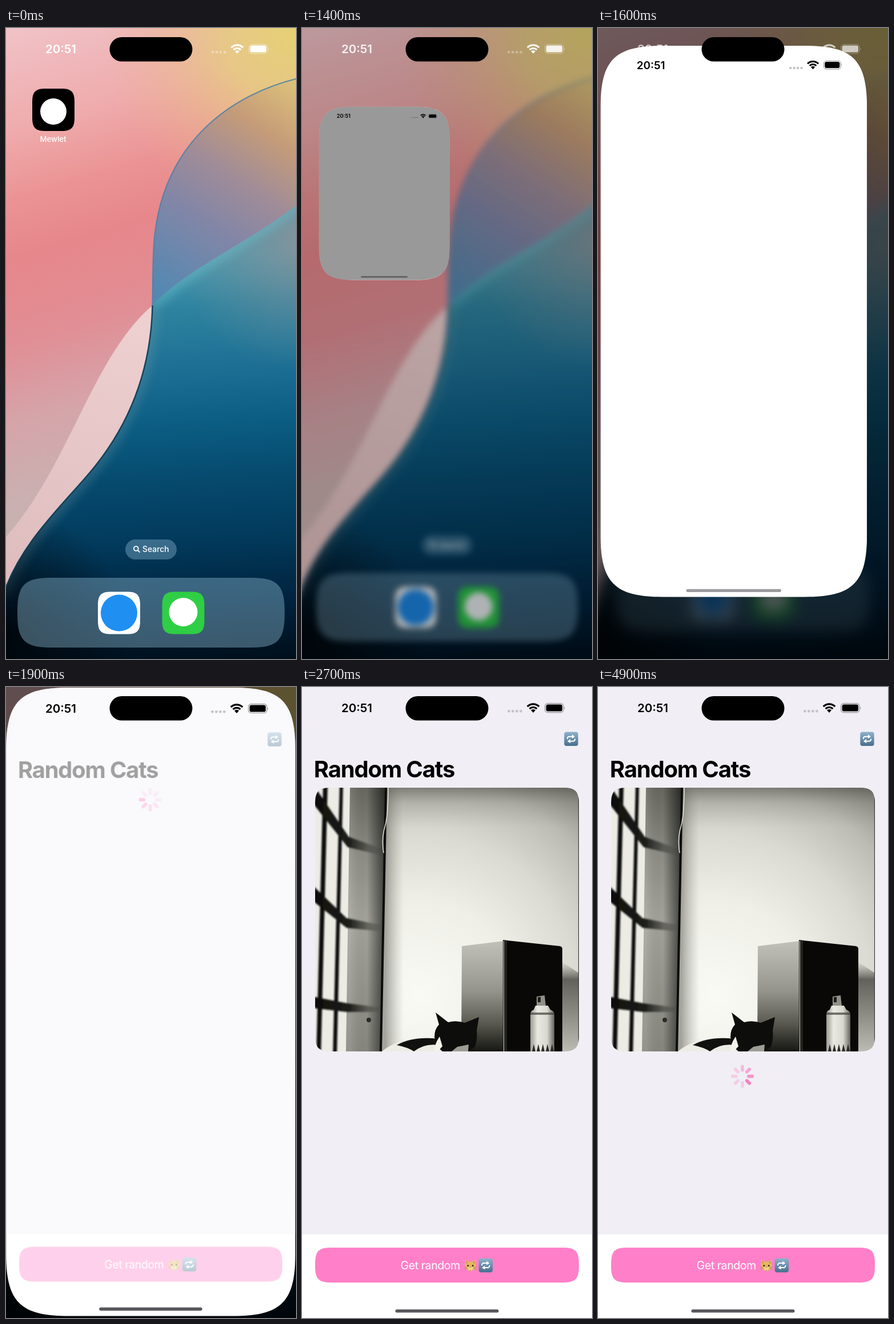
Write an HTML page that moves like this. It is 508 px wide and 1103 px high and loops after 5 s.

```html
<!DOCTYPE html>
<html lang="en">
<head>
<meta charset="utf-8">
<title>Random Cats</title>
<style>
html, body { margin: 0; width: 100%; height: 100%; overflow: hidden; background: #000; }
svg { display: block; width: 508px; height: 1103px; }
text { font-family: Inter, sans-serif; font-optical-sizing: none; }
</style>
</head>
<body>
<svg id="stage" viewBox="0 0 508 1103" xmlns="http://www.w3.org/2000/svg"></svg>
<script>
const LOOP = 5000, STEP = 100, W = 508, H = 1103;
const stage = document.getElementById('stage');

// Rounded rectangle with continuous corners
function squircle(x, y, w, h, r) {
  const e = Math.min(r * 1.4, w / 2, h / 2), c = r * 0.315;
  const X = x + w, Y = y + h;
  return `M${x + e},${y}H${X - e}C${X - c},${y} ${X},${y + c} ${X},${y + e}` +
    `V${Y - e}C${X},${Y - c} ${X - c},${Y} ${X - e},${Y}` +
    `H${x + e}C${x + c},${Y} ${x},${Y - c} ${x},${Y - e}` +
    `V${y + e}C${x},${y + c} ${x + c},${y} ${x + e},${y}Z`;
}

const stops = list => list.map(([o, c, a = 1]) =>
  `<stop offset="${o}" stop-color="${c}" stop-opacity="${a}"/>`).join('');
const linear = (id, x1, y1, x2, y2, list) =>
  `<linearGradient id="${id}" gradientUnits="userSpaceOnUse" x1="${x1}" y1="${y1}" x2="${x2}" y2="${y2}">${stops(list)}</linearGradient>`;
const radial = (id, cx, cy, r, list) =>
  `<radialGradient id="${id}" gradientUnits="userSpaceOnUse" cx="${cx}" cy="${cy}" r="${r}">${stops(list)}</radialGradient>`;

const defs = `<defs>
  ${linear('pink', 0, 0, 250, 850, [[0, '#f0c3c8'], [.2, '#efabac'], [.33, '#eb9394'], [.44, '#e6878b'],
    [.6, '#e18e95'], [.75, '#d5a4a9'], [.9, '#cab0b0'], [1, '#c6b2b0']])}
  ${radial('sun', 500, 10, 330, [[0, '#e5d076'], [.35, '#e6cc80', .85], [1, '#eab090', 0]])}
  ${linear('glass', 508, 100, 270, 460, [[0, '#dcc07a'], [.22, '#c69c78'], [.45, '#a08c98'], [.65, '#8486a6'], [1, '#5488b2']])}
  ${linear('sea', 340, 400, 380, 1103, [[0, '#4f9db0'], [.12, '#2f84a0'], [.3, '#1a6c92'], [.42, '#0b5c82'],
    [.55, '#064a6e'], [.7, '#023a5c'], [.85, '#002440'], [1, '#000f1c']])}
  ${radial('mist', 520, 370, 230, [[0, '#8b9298', .9], [1, '#6a8c9c', 0]])}
  ${radial('deep', 0, 1060, 220, [[0, '#000', .75], [1, '#000', 0]])}
  ${linear('pale', 200, 500, 60, 960, [[0, '#eed0d0'], [1, '#dfbdbe']])}
  ${linear('tile', 0, 0, 0, 24, [[0, '#8fb2cc'], [1, '#47708f']])}
  ${radial('wall', 205, 540, 470, [[0, '#fafaf5'], [.35, '#efefe8'], [.6, '#dadad2'], [.8, '#bcbcb4'], [1, '#84847c']])}
  ${linear('top', 0, 176, 0, 245, [[0, '#3c3c36', .5], [.4, '#5c5c55', .2], [1, '#77776f', 0]])}
  ${linear('wood', 0, 176, 0, 637, [[0, '#66665f'], [.25, '#8c8c85'], [.5, '#a3a39b'], [1, '#86867f']])}
  ${linear('grain', 84, 0, 143, 0, [[0, '#fff', .12], [.5, '#000', 0], [1, '#000', .55]])}
  ${linear('beam', 23, 0, 142, 0, [[0, '#0e0e0c'], [.5, '#1c1c19'], [.7, '#30302c', .7], [1, '#40403c', .1]])}
  ${linear('edge', 146, 0, 178, 0, [[0, '#55554e', .5], [1, '#8a8a82', 0]])}
  ${linear('side', 0, 446, 0, 637, [[0, '#c0c0b8'], [.45, '#94948c'], [.75, '#58584f'], [1, '#161613']])}
  ${linear('shade', 0, 480, 0, 637, [[0, '#66665f', 0], [.2, '#4c4c46', .85], [.5, '#6c6c65', .8], [1, '#b4b4ac', .8]])}
  ${linear('can', 400, 0, 442, 0, [[0, '#9b9b94'], [.3, '#eaeae3'], [.7, '#d8d8d0'], [1, '#66665f']])}
  <filter id="soft" x="-20%" y="-20%" width="140%" height="140%"><feGaussianBlur stdDeviation="9"/></filter>
  <filter id="haze" x="-20%" y="-20%" width="140%" height="140%"><feGaussianBlur stdDeviation="1.6"/></filter>
  <clipPath id="seaClip"><path id="seaShape"/></clipPath>
  <clipPath id="winClip"><path id="winShape"/></clipPath>
  <clipPath id="photoClip"><path d="${squircle(23, 176, 462, 461, 20)}"/></clipPath>
</defs>`;

const foldUp = 'C400,112 262,200 258,400 C257,430 257,455 256.5,485';
const foldDown = 'C254,600 215,700 140,785 C85,848 25,905 -5,990';
const hillUp = 'C320,418 420,380 520,301';
const hillDown = 'C150,575 110,770 -5,895';
const sea = `M600,230L520,301C420,380 320,418 256.5,485${foldDown}L-60,1130V1200H600Z`;

const wallpaper = `
  <rect x="-60" y="-60" width="628" height="1223" fill="url(#pink)"/>
  <rect x="-60" y="-60" width="628" height="700" fill="url(#sun)"/>
  <path d="M256.5,485${hillDown}L-60,960V1130L-5,990C25,905 85,848 140,785 C215,700 254,600 256.5,485Z" fill="url(#pale)"/>
  <path d="M600,70L520,86${foldUp}${hillUp}L600,230Z" fill="url(#glass)"/>
  <path d="${sea}" fill="url(#sea)"/>
  <g clip-path="url(#seaClip)">
    <rect y="200" width="600" height="500" fill="url(#mist)"/>
    <path d="M256.5,485${hillUp}" fill="none" stroke="#6cc0cc" stroke-width="18" opacity=".55" filter="url(#soft)"/>
    <path d="M256.5,485${foldDown}" fill="none" stroke="#7fa3a8" stroke-width="20" opacity=".3" filter="url(#soft)"/>
    <rect x="-60" y="800" width="320" height="360" fill="url(#deep)"/>
  </g>
  <path d="M520,86${foldUp}" fill="none" stroke="#4d82a8" stroke-width="2.2" opacity=".85"/>
  <path d="M256.5,485${foldDown}" fill="none" stroke="#0b3950" stroke-width="2.4" opacity=".9"/>`;

const appTile = (x, y, fill, cx, cy, r, mark, id = '') =>
  `<path d="${squircle(x, y, 74, 74, 17)}" fill="${fill}"/><circle ${id} cx="${cx}" cy="${cy}" r="${r}" fill="${mark}"/>`;

const springboard = `
  <g id="launchIcon">
    ${appTile(46, 106, '#000', 83, 146, 23, '#fff', 'id="mark"')}
    <text x="82.5" y="199" font-size="13.2" font-weight="500" fill="#fff" text-anchor="middle">Mewlet</text>
  </g>
  <rect x="209" y="894" width="90" height="35" rx="17.5" fill="#8cb9d2" fill-opacity=".4"/>
  <g fill="none" stroke="#fff" stroke-width="1.8" stroke-linecap="round">
    <circle cx="227.8" cy="910" r="3.9"/><path d="M230.8,913L234,916.2"/>
  </g>
  <text x="239" y="916.3" font-size="13.9" font-weight="500" fill="#fff">Search</text>
  <path d="${squircle(20, 961, 468, 122, 41)}" fill="#8cb9d2" fill-opacity=".42"/>
  ${appTile(161, 985.5, '#fff', 198, 1022.5, 32, '#1f8ff2')}
  ${appTile(273.5, 985.5, '#2fce45', 310.5, 1021, 25, '#fff')}`;

function statusBar(ink, dots) {
  const arc = r => {
    const d = r * Math.SQRT1_2;
    return `M${405 - d},${44.5 - d}A${r},${r} 0 0 1 ${405 + d},${44.5 - d}`;
  };
  return `<text x="96" y="44.2" font-size="20.5" font-weight="600" fill="${ink}" text-anchor="middle">20:51</text>
    <g fill="${dots}">${[0, 1, 2, 3].map(i => `<rect x="${360 + i * 7}" y="40" width="4.6" height="4.6" rx="1.8"/>`).join('')}</g>
    <path d="${arc(14.6)}${arc(9)}" fill="none" stroke="${ink}" stroke-width="3.2"/>
    <path d="M405,45L401,40.6A5.6,5.6 0 0 1 409,40.6Z" fill="${ink}"/>
    <rect x="425.6" y="28.6" width="32.4" height="16" rx="5" fill="none" stroke="${ink}" stroke-opacity=".4" stroke-width="1.2"/>
    <rect x="427.6" y="30.6" width="28.4" height="12" rx="3.4" fill="${ink}"/>
    <path d="M459.4,34.2q1.8,2.4 0,4.8z" fill="${ink}" opacity=".5"/>`;
}

const arrow = '<path d="M5.4,12.2V11a3,3 0 0 1 3,-3H14" fill="none" stroke="#fff" stroke-width="2"/><path d="M13.4,4.4L18.6,8L13.4,11.6Z" fill="#fff"/>';
const repeat = (x, y) => `<g transform="translate(${x},${y})">
  <rect width="24.4" height="24.4" rx="4" fill="url(#tile)"/>
  <g transform="translate(.2,.2)">${arrow}<g transform="rotate(180 12 12)">${arrow}</g></g></g>`;

const kitty = `<g transform="translate(295,1011)">
  <path d="M-9,-10L-3.5,-6.5H3.5L9,-10L9.4,1C10,7 5,9.6 0,9.6S-10,7 -9.4,1Z" fill="#e3b860"/>
  <path d="M-7.6,-7.2L-4.4,-5.2L-7.6,-2.4ZM7.6,-7.2L4.4,-5.2L7.6,-2.4Z" fill="#c98a5c"/>
  <ellipse cy="5.2" rx="4.2" ry="2.8" fill="#efd592"/>
  <circle cx="-4.2" cy=".4" r="1.5" fill="#3a2a1a"/><circle cx="4.2" cy=".4" r="1.5" fill="#3a2a1a"/>
  <path d="M-1.5,3H1.5L0,4.6Z" fill="#b9605c"/>
  <path d="M-10.5,3L-6,4M-10,6.6L-6,5.8M10.5,3L6,4M10,6.6L6,5.8" stroke="#8a6a3a" stroke-width=".6"/></g>`;

const photo = `<g clip-path="url(#photoClip)">
  <rect x="23" y="176" width="462" height="461" fill="url(#wall)"/>
  <rect x="140" y="176" width="345" height="70" fill="url(#top)"/>
  <rect x="140" y="176" width="40" height="461" fill="url(#edge)"/>
  <path d="M23,176H85L78,637H23Z" fill="#ecece5"/>
  <path d="M84,176H146L137,637H77Z" fill="url(#wood)"/>
  <path d="M84,176H146L137,637H77Z" fill="url(#grain)"/>
  <g filter="url(#haze)">
    <path d="M37,170H45L33,645H25ZM66,170H72L61,645H54Z" fill="#10100e"/>
    <path d="M18,168L82,262L140,283V294L80,280L18,202ZM18,346L78,404L138,416V427L78,421L18,373ZM18,541L80,553L136,560V568L78,568L18,561Z" fill="url(#beam)"/>
  </g>
  <path d="M145,176H149L140,637H136Z" fill="#0c0c0a"/>
  <path d="M151,176Q151,225 145,245T143,290" fill="none" stroke="#deded6" stroke-width="1.6"/>
  <circle cx="117" cy="582" r="4" fill="#2a2a26"/>
  <path d="M455,480L485,500V637H455Z" fill="url(#shade)"/>
  <path d="M280,453L353,444V637H279Z" fill="url(#side)"/>
  <path d="M352,442L361,443V637H352Z" fill="#24241f"/><path d="M353.5,444V637" stroke="#c9c9c1"/>
  <path d="M359,443L452,453Q456,454 456,458V637H359Z" fill="#0a0806"/>
  <path d="M484.5,176V637" stroke="#24241f"/>
  <path d="M411,541L425,539L427,557H411Z" fill="#8f8f87"/><path d="M413,542H418V551H413Z" fill="#1c1c18"/>
  <path d="M400,637V574Q400,566 406,564L409,557H431L435,564Q442,566 442,574V637Z" fill="url(#can)"/>
  <path d="M400,569H442V573H400Z" fill="#44443e" opacity=".7"/>
  <path d="M403,637L406,624L409,637ZM411,637L414,624L417,637ZM419,637L422,624L425,637ZM427,637L430,624L433,637ZM435,637L438,624L441,637Z" fill="#2a2a26"/>
  <path d="M140,637Q160,620 190,616Q222,612 245,626V637Z" fill="#ecece5"/>
  <path d="M166,626Q195,610 238,615L240,626Q215,622 196,637Q186,630 166,626Z" fill="#11110f"/>
  <path d="M232,612Q232,598 240,590L234,569L256,586Q270,582 285,587L310,577Q308,590 306,600Q308,618 302,630L292,637H246Q236,630 232,612Z" fill="#0d0d0b"/>
  <path d="M241,611L246,628L238,637H232Q232,624 241,611Z" fill="#f2f2eb"/>
  <path d="M272,629L292,625L291,637H262Z" fill="#9d9d95"/>
</g>`;

const blades = [...Array(8).keys()].map(i =>
  `<path d="M0,-11V-17.2" transform="rotate(${i * 45})" stroke="#f57cc0" stroke-width="5.8" stroke-linecap="round"/>`).join('');

const app = `
  <rect width="508" height="957" fill="#f1eff5"/>
  <text x="20.8" y="158" font-size="40" font-weight="700" letter-spacing="-1.2" fill="#000">Random Cats</text>
  ${repeat(459.3, 78.5)}
  <g id="photo">${photo}</g>
  <g id="spinner">${blades}</g>
  <g id="button">
    <path d="${squircle(23, 980, 462, 61, 20)}" fill="#ff80c8"/>
    <path id="press" d="${squircle(23, 980, 462, 61, 20)}" fill="#300020"/>
    <text x="172.5" y="1018" font-size="19.6" letter-spacing="-.45" fill="#fff">Get random</text>
    ${kitty}${repeat(309.6, 998.8)}
  </g>`;

stage.innerHTML = defs + `
  <g id="home">
    <g id="back">${wallpaper}</g>
    <g id="icons">${springboard}</g>
    <rect id="dim" width="508" height="1103"/>
    <g id="homeStatus">${statusBar('#fff', 'rgba(255,255,255,.35)')}</g>
  </g>
  <g id="win" clip-path="url(#winClip)">
    <g id="page">
      <rect width="508" height="1300" fill="#fff"/>
      <g id="app">${app}</g>
      ${statusBar('#000', '#c4c3c8')}
      <rect id="bar" x="163.5" width="181" height="5.6" rx="2.8" fill="#59575c"/>
    </g>
    <rect id="cover"/>
  </g>
  <rect x="181.5" y="16" width="145" height="42.5" rx="21.2"/>`;

const el = {};
stage.querySelectorAll('[id]').forEach(n => el[n.id] = n);
const set = (id, props) => { for (const k in props) el[id].setAttribute(k, props[k]); };
const show = (id, on) => set(id, { display: on ? 'inline' : 'none' });
const clamp = v => Math.max(0, Math.min(1, v));
const mix = (a, b, p) => a + (b - a) * p;

set('seaShape', { d: sea });
const bladeEls = [...el.spinner.children];

function launch(t) {
  const open = t >= 1400, full = t >= 2000;
  const x = 0.0135 * (t - 1307);
  const p = full ? 1 : open ? 1 - (1 + x) * Math.exp(-x) : 0;

  show('home', !full);
  show('win', open);
  show('launchIcon', !open);
  set('mark', { fill: t >= 1200 ? '#98989b' : '#fff' });
  const blur = p > 0 && !full ? `blur(${15 * p}px)` : 'none';
  el.back.style.filter = el.icons.style.filter = blur;
  const k = 1 - 0.058 * p;
  set('icons', {
    transform: `translate(${254 * (1 - k)},${551.5 * (1 - k)}) scale(${k})`,
    opacity: 1 - 0.35 * p
  });
  set('dim', { opacity: 0.6 * p });
  set('homeStatus', { opacity: 1 - 0.35 * p });
  if (!open) return;

  // The window grows out of the icon; its height trails its width
  const w = mix(74, W, p), h = mix(74, H, p ** 1.46), s = w / W;
  const left = mix(46, 0, p), top = mix(143, H / 2, p) - h / 2;
  const r = full ? 0 : mix(16, 78, clamp(p * 1.2));
  set('winShape', { d: squircle(left, top, w, h, r) });
  set('page', { transform: `translate(${left},${top}) scale(${s})` });
  set('bar', { y: h / s - 15, opacity: t < 1900 ? 0.6 : 1 });
  set('cover', { x: left, y: top, width: w, height: h, opacity: t < 1500 ? 0.4 : 0 });
}

function content(t) {
  set('app', { opacity: clamp((t - 1780) / 320) });

  const loaded = clamp((t - 2500) / 200), again = t >= 4700;
  set('photo', { opacity: loaded });
  set('spinner', {
    transform: `translate(253,${again ? 680.5 : 196.5})`,
    opacity: again ? 1 : 1 - loaded
  });
  const head = t / STEP + (again ? 2 : 3);
  bladeEls.forEach((b, i) => {
    const age = (head - i + 80) % 8;
    b.setAttribute('opacity', Math.max(0.28, 0.95 - age * 0.17));
  });

  const push = t >= 4300 && t < 4800 ? Math.sin(Math.PI * (t - 4250) / 550) : 0;
  const k = 1 - 0.032 * push;
  set('button', { transform: `translate(${254 * (1 - k)},${1010.5 * (1 - k)}) scale(${k})` });
  set('press', { opacity: 0.18 * push });
}

function draw(ms) {
  const t = Math.floor(ms % LOOP / STEP) * STEP;
  launch(t);
  content(t);
}

const start = performance.now();
function tick() {
  draw(performance.now() - start);
  requestAnimationFrame(tick);
}
tick();
</script>
</body>
</html>
```
